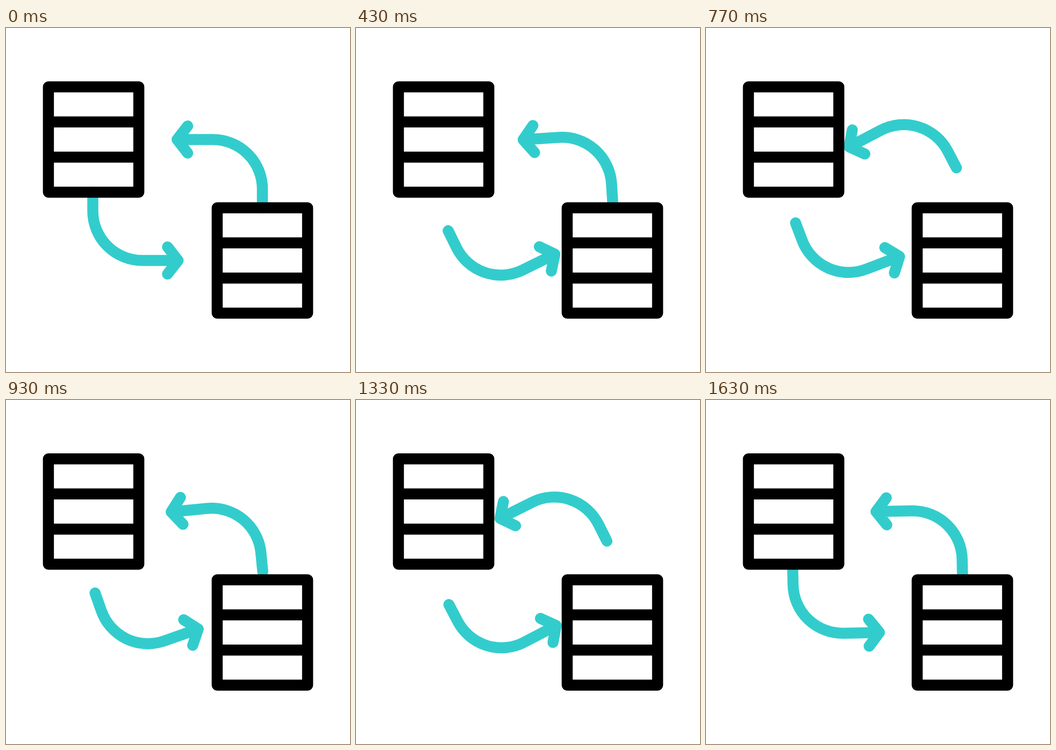
These frames come from a looping animation (640x640 px, 1.67 s). An HTML page:

```html
<!DOCTYPE html>
<html lang="en">
<head>
<meta charset="utf-8">
<title>Server exchange</title>
<style>
  html, body { margin: 0; width: 100%; height: 100%; overflow: hidden; background: #fff; }
  svg { display: block; width: 100%; height: 100%; }
  .line { fill: none; stroke-width: 20.5; stroke-linecap: round; stroke-linejoin: round; }
  .arrow { stroke: #33cccc; }
  .server { stroke: #000; }
</style>
</head>
<body>
<svg viewBox="0 0 640 640">
  <defs>
    <path id="arrow" class="line arrow"
      d="M477 334.5V299.5A92 92 0 0 0 385 207.5H318.3M338 182.3L318.3 207.5L338 232.7"/>
    <path id="server" class="line server"
      d="M78.9 109.4H247.1V305.6H78.9ZM78.9 174.7H247.1M78.9 240.3H247.1"/>
  </defs>
  <g id="upper"><use href="#arrow"/></g>
  <g id="lower"><use href="#arrow" transform="rotate(180 319.25 320)"/></g>
  <use href="#server"/>
  <use href="#server" x="314" y="225"/>
</svg>
<script>
  const LOOP = 1670;
  const SWING = 28;

  // [step, swings completed]; 30 steps per second
  const tracks = {
    upper: [[0, 0], [8, .561], [17, 1.136], [23, 1.538], [34, 2.217], [40, 2.57], [48, 2.937], [49, 2.938]],
    lower: [[0, 0], [8, .28], [17, .868], [23, 1.33], [34, 2.092], [40, 2.462], [48, 2.925], [49, 2.932]]
  };

  const slope = (a, b) => (b[1] - a[1]) / (b[0] - a[0]);

  // Harmonic mean keeps the curve monotone between keys.
  function tangent(keys, i) {
    if (i === 0) return slope(keys[0], keys[1]);
    if (i === keys.length - 1) return slope(keys[i - 1], keys[i]);
    const before = slope(keys[i - 1], keys[i]);
    const after = slope(keys[i], keys[i + 1]);
    return 2 * before * after / (before + after);
  }

  function sample(keys, x) {
    const i = Math.min(keys.filter(k => k[0] <= x).length - 1, keys.length - 2);
    const [x0, y0] = keys[i];
    const [x1, y1] = keys[i + 1];
    const w = x1 - x0;
    const u = (x - x0) / w;
    const v = 1 - u;
    return y0 * v * v * (1 + 2 * u) + y1 * u * u * (1 + 2 * v)
      + w * u * v * (v * tangent(keys, i) - u * tangent(keys, i + 1));
  }

  const start = performance.now();

  function draw() {
    const time = (performance.now() - start) % LOOP;
    const step = Math.floor((Math.floor(time / 10) + .5) * .3);
    for (const [id, keys] of Object.entries(tracks)) {
      const angle = SWING * Math.sin(Math.PI * sample(keys, step)) ** 2;
      document.getElementById(id).setAttribute("transform", `rotate(${-angle} 320 320)`);
    }
    requestAnimationFrame(draw);
  }
  draw();
</script>
</body>
</html>
```
